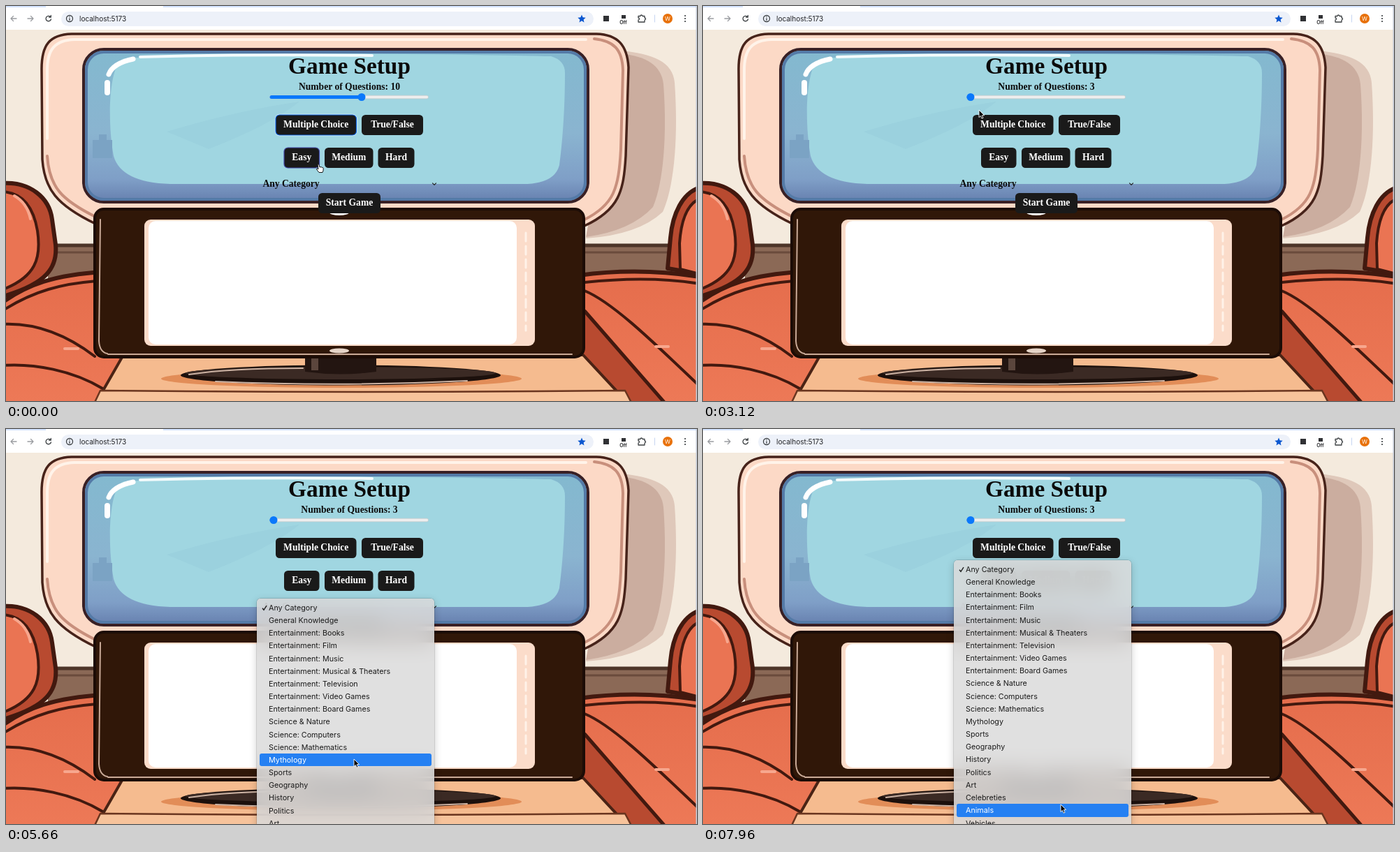
Recreate the animation shown at these times as an HTML page. Size 989 px wide and 566 px high, loop 8 s.

```html
<!DOCTYPE html>
<html lang="en">
<head>
<meta charset="utf-8">
<title>Game Setup</title>
<style>
html, body { margin: 0; width: 100%; height: 100%; overflow: hidden; }
#stage { position: relative; width: 989px; height: 566px; overflow: hidden; }
svg { position: absolute; left: 0; top: 0; }
.ui { font: 10px Inter, sans-serif; fill: #202124; }
.quirky { font: bold 13.6px "Liberation Serif", serif; text-anchor: middle; }
#menu { position: absolute; left: 359px; bottom: -20px; width: 246px; padding: 4px;
  border-radius: 5px; background: rgba(219,219,219,.86); backdrop-filter: blur(16px);
  box-shadow: 0 0 0 .5px rgba(0,0,0,.25), 0 3px 12px rgba(0,0,0,.2);
  font: 10.75px/19.2px Inter, sans-serif; color: #1b1b1b; white-space: nowrap; }
#menu div { position: relative; height: 18.17px; padding-left: 13px; border-radius: 3px; }
#menu div.on { background: #2580f2; color: #fff; }
#menu svg { left: 3px; top: 5px; }
</style>
</head>
<body>
<div id="stage">
<svg width="989" height="566" fill="none" stroke-linejoin="round" stroke-linecap="round">
  <defs>
    <linearGradient id="glass" x2="0" y2="1">
      <stop stop-color="#83b9cf"/><stop offset=".55" stop-color="#8ab4d0"/>
      <stop offset=".85" stop-color="#7f9fc7"/><stop offset="1" stop-color="#667fae"/>
    </linearGradient>
    <linearGradient id="seat" x2="0" y2="1">
      <stop stop-color="#e56d4c"/><stop offset="1" stop-color="#ed7957"/>
    </linearGradient>
  </defs>

  <!-- room -->
  <path fill="#f4eadd" d="M0 34H989V566H0z"/>
  <path fill="#dfc8ba" d="M880 64C925 68 955 80 957 110C962 180 958 255 940 295Q905 328 830 333z"/>
  <path fill="#cbad9f" d="M880 68C915 72 938 84 941 112C946 180 942 250 926 288Q895 322 830 331z"/>
  <path fill="#8b6956" d="M60 342H960V400H60z"/>
  <path stroke="#4c3428" stroke-width="5" d="M66 343H130M826 343H952"/>
  <path stroke="#6a4b3c" stroke-width="3" d="M70 353H130M826 353H952"/>

  <!-- sofa, left and right -->
  <g stroke="#42190f" stroke-width="6">
    <path fill="url(#seat)" d="M-4 424C30 400 68 385 140 381V500L170 503 130 570H-4z"/>
    <path fill="#b84a30" d="M-4 254C34 252 62 274 66 306L71 342C74 375 58 398 -4 416z"/>
    <path fill="#ea7453" stroke-width="4" d="M-4 266C26 268 40 292 45 322C51 362 42 388 -4 406z"/>
    <path fill="url(#seat)" d="M820 386C870 379 930 378 993 388V570H885L820 500z"/>
    <path fill="#b84a30" d="M993 260C968 268 954 298 951 332L947 376 993 384z"/>
    <path fill="#ea7453" stroke-width="4" d="M993 276C974 284 966 310 964 340L965 377 993 384z"/>
    <path fill="#b84a30" stroke-width="5" d="M815 426L829 438 944 570H888L815 496z"/>
    <path stroke-width="4" d="M-4 436C40 408 80 398 130 394M-4 456C40 454 85 470 127 502M-4 515C40 512 95 522 138 548M828 396Q920 386 993 398M828 408C870 425 935 490 993 545"/>
  </g>
  <path stroke="#f7a78e" stroke-width="4" d="M12 272Q30 282 35 305M84 491H103M930 488H948"/>

  <!-- table and stand -->
  <path fill="#f5bb8f" stroke="#4a2315" stroke-width="4" d="M168 500H826L891 570H128z"/>
  <path fill="#f7c39b" stroke="#6a351f" stroke-width="2.500" d="M135 551Q500 555 886 551L896 570H126z"/>
  <ellipse cx="480" cy="534" rx="258" ry="13" fill="#e28d58"/>
  <ellipse cx="479" cy="529" rx="229" ry="14.500" fill="#1c100c"/>
  <ellipse cx="479" cy="526" rx="222" ry="9" fill="#3b2a24"/>
  <path stroke="#cbb2a3" stroke-width="2" d="M262 528Q320 519 425 519M300 538Q480 546 660 537"/>
  <path fill="#231511" d="M428 498H530V524Q479 531 428 524z"/>
  <path fill="#5b463d" d="M437 505H447V522H437z"/>

  <!-- upper television -->
  <path fill="#fcd9c6" stroke="#47231a" stroke-width="3.500" d="M51 90C51 56 62 41 94 40H845C876 41 889 56 891 88L887 215C884 265 878 292 828 315L128 312C72 285 55 262 52 220z"/>
  <path stroke="#c88f7c" stroke-width="4" d="M59 215C62 260 80 278 128 302M828 306C870 285 877 262 880 205L883 92C882 62 870 50 842 47"/>
  <path stroke="#fff3e9" stroke-width="4" d="M59 190V92C59 62 70 49 98 48H830"/>
  <rect x="111" y="62" width="722" height="219" rx="29" fill="url(#glass)" stroke="#392025" stroke-width="4"/>
  <rect x="115" y="66" width="714" height="211" rx="25" stroke="#547aa7" stroke-width="4"/>
  <path fill="#a0d6e1" d="M170 75Q400 64 780 72Q801 78 800 98C800 150 796 200 792 228Q785 255 740 255H235Q165 253 154 215C144 160 148 78 170 75z"/>
  <path fill="#9bd1de" d="M230 180Q330 150 420 137Q380 170 290 205z"/>
  <path fill="#7ba3c4" d="M124 218V192H133V184H144V192H152V218z"/>
  <path stroke="#fff" stroke-width="8" d="M145 110V124"/>
  <path stroke="#fff" stroke-width="7" d="M147 98Q153 82 182 76"/>
  <path stroke="#f3fbfc" stroke-width="4" d="M192 73Q330 69 524 71"/>

  <!-- lower television -->
  <path fill="#fcd9c6" d="M130 283H826V292H130z"/>
  <rect x="127" y="291" width="700" height="212" rx="13" fill="#301708" stroke="#1c0c06" stroke-width="4"/>
  <path stroke="#c9aa98" stroke-width="2" d="M135 306L133 480Q134 496 145 498M146 499H810"/>
  <rect x="198" y="306" width="559" height="181" rx="9" fill="#fbdcca"/>
  <rect x="204" y="308" width="527" height="177" rx="10" fill="#fff"/>
  <path stroke="#fff2e8" stroke-width="3" stroke-dasharray="12 7" d="M744 325V465"/>
  <ellipse cx="477" cy="296" rx="14" ry="4" fill="#fff"/>
  <ellipse cx="477" cy="494" rx="14" ry="3.500" fill="#e5d3c6"/>

  <!-- browser bar -->
  <path fill="#fff" d="M0 0H989V34H0z"/>
  <path fill="#d3e3fd" d="M0 0H57V2H0zM225 0H989V2H225z"/>
  <rect x="79" y="8" width="762" height="21" rx="10.500" fill="#edf1f9"/>
  <path stroke="#9b9da1" stroke-width="1.300" d="M15 18H7M10.500 14.500L7 18 10.500 21.500M31 18H39M35.500 14.500L39 18 35.500 21.500"/>
  <g stroke="#3c4043" stroke-width="1.300">
    <path d="M63.500 15.500A3.700 3.700 0 1 0 64.400 19M64.300 13.500V16.200H61.500"/>
    <circle cx="91" cy="18" r="4.500"/><path d="M91 17.800V20.200M91 15.700V15.800"/>
    <path d="M905 14.500H908A1.500 1.500 0 0 1 911 14.500H914V17A1.500 1.500 0 0 1 914 20V23H905V20A1.500 1.500 0 0 0 905 17z"/>
  </g>
  <path fill="#0b57d0" d="M824 12.500L825.600 16.300 829.700 16.700 826.600 19.400 827.500 23.400 824 21.300 820.500 23.400 821.400 19.400 818.300 16.700 822.400 16.300z"/>
  <path fill="#303134" d="M855 14H863V22H855zM881 13H887V18H881z"/>
  <path stroke="#c6d5f1" d="M928.500 13V23"/>
  <circle cx="947" cy="18" r="7" fill="#e8710a"/>
  <path stroke="#3c4043" stroke-width="2.200" d="M972 14V14.010M972 18V18.010M972 22V22.010"/>
  <g class="ui">
    <text x="105" y="21.700">localhost:5173</text>
    <text x="883.500" y="25.500" style="font-size:7px;font-weight:600" text-anchor="middle">Off</text>
    <text x="947" y="20.900" style="font-size:8px;fill:#fff" text-anchor="middle">W</text>
  </g>
  <path stroke="#c3cad6" stroke-width="2" d="M988.500 0V566"/>

  <!-- form -->
  <g class="quirky" fill="#0b0b0b">
    <text x="491.500" y="96.500" style="font-size:33.300px">Game Setup</text>
    <text id="count" x="491.500" y="120"></text>
    <text x="408" y="259">Any Category</text>
  </g>
  <path stroke="#222" stroke-width="1.200" d="M610.500 253.800L613 256.300 615.500 253.800"/>
  <rect x="377.500" y="128.200" width="227" height="4.600" rx="2.300" fill="#eee" stroke="#c4c4c4" stroke-width=".6"/>
  <g id="slider">
    <rect id="fill" x="377.500" y="128" height="5" rx="2.500"/>
    <circle id="thumb" cy="130.500" r="5.500"/>
  </g>
  <g id="buttons" class="quirky"></g>
</svg>
<div id="menu"></div>
<svg width="989" height="566">
  <g id="pointer" stroke-linejoin="round">
    <path id="arrow" fill="#000" stroke="#fff" stroke-width=".9" d="M0 0V10.600L2.400 8.400 4.100 12.200 6 11.400 4.300 7.700H7.600z"/>
    <path id="hand" fill="#fff" stroke="#000" stroke-width=".9" d="M-1 0Q.2-1 1 .4L2 4Q3 3 4 4Q5 3.300 5.700 4.500Q7 4.200 7.200 5.500L7 9 6 11.500H1L-2.500 7Q-2.500 5.500-1 6L0 6.800z"/>
  </g>
</svg>
</div>
<script>
const LOOP = 8000, ROW = 18.17, MENU_TOP = 243, FIRST_ROW = 256;
const $ = id => document.getElementById(id);
const NS = "http://www.w3.org/2000/svg";

function add(parent, tag, attrs, text = "") {
  const el = document.createElementNS(NS, tag);
  for (const name in attrs) el.setAttribute(name, attrs[name]);
  el.textContent = text;
  return parent.appendChild(el);
}

const buttons = [
  ["Multiple Choice", 386, 156, 115.5], ["True/False", 509, 156, 88],
  ["Easy", 398, 203, 50.5], ["Medium", 456, 203, 69.5], ["Hard", 532.5, 203, 52],
  ["Start Game", 447, 268, 89]
].map(([label, x, y, width]) => {
  const group = $("buttons"), box = { x, y, width, height: 29, rx: 5.5 };
  const halo = add(group, "rect", { ...box, stroke: "#fff", "stroke-width": 2.4, "stroke-opacity": .7 });
  const rect = add(group, "rect", { ...box, fill: "#1a1a1a", "stroke-width": 1.2 });
  add(group, "text", { x: x + width / 2, y: y + 18, fill: "#fff" }, label);
  return { label, halo, rect,
    contains: (px, py) => px >= x && px <= x + width && py >= y && py <= y + 29 };
});

const rows = ["Any Category", "General Knowledge",
  ...["Books", "Film", "Music", "Musical & Theaters", "Television", "Video Games", "Board Games"]
    .map(name => "Entertainment: " + name),
  "Science & Nature", "Science: Computers", "Science: Mathematics", "Mythology", "Sports",
  "Geography", "History", "Politics", "Art", "Celebreties", "Animals", "Vehicles"
].map(name => {
  const row = document.createElement("div");
  row.textContent = name;
  return $("menu").appendChild(row);
});
const check = add(rows[0], "svg", { width: 8, height: 9 });
add(check, "path", { d: "M1 4.8L3 7.3 7 1.2", fill: "none", stroke: "currentColor", "stroke-width": 1.4 });

// pointer tip: time, x, y
const path = [
  [0, 447, 227], [110, 447, 227], [320, 430, 220], [710, 556, 220], [1010, 492, 220],
  [1160, 495, 222], [1310, 510, 278], [1460, 510, 278], [2060, 440, 140], [2210, 383, 131],
  [2660, 383, 131], [3110, 395, 149], [3560, 420, 225], [3710, 408, 256], [4010, 408, 256],
  [4910, 470, 306], [5060, 470, 306], [5360, 492, 443], [5660, 498, 473], [6260, 498, 473],
  [7160, 511, 546], [7460, 511, 546], [7910, 512, 538], [LOOP, 512, 538]
];

function pointerAt(t) {
  const tick = t < 110 ? 0 : t - (t - 110) % 150;
  const i = path.findIndex(key => key[0] > tick);
  const [t0, x0, y0] = path[i - 1], [t1, x1, y1] = path[i];
  const p = (tick - t0) / (t1 - t0);
  return [x0 + (x1 - x0) * p, y0 + (y1 - y0) * p];
}

function focusAt(t) {
  return t < 320 ? "Multiple Choice" : t < 920 ? "Easy" : t < 2320 ? "Medium" : "";
}

function draw(t) {
  const [x, y] = pointerAt(t);
  const open = t >= 3870, focus = focusAt(t);
  let overButton = false;

  for (const { label, halo, rect, contains } of buttons) {
    const hover = !open && contains(x, y), focused = label === focus;
    overButton ||= hover;
    halo.style.display = focused ? "" : "none";
    rect.setAttribute("stroke", focused ? "#0b66e4" : hover ? "#4348a8" : "none");
  }

  const value = t < 2470 ? 10 : 3, thumbX = 383 + (value - 3) * 18;
  const overSlider = !open && y > 124 && y < 137 && x > 377 && x < 605;
  $("count").textContent = "Number of Questions: " + value;
  $("thumb").setAttribute("cx", thumbX);
  $("fill").setAttribute("width", thumbX - 377.5);
  $("slider").setAttribute("fill", overSlider ? "#005cc8" : "#0a78fb");

  const scroll = Math.max(0, Math.min(3, Math.floor((t - 7510) / 150) + 1)) * ROW;
  const active = Math.round((y - FIRST_ROW + scroll) / ROW);
  $("menu").style.display = open ? "" : "none";
  $("menu").style.top = MENU_TOP - scroll + "px";
  rows.forEach((row, i) => row.classList.toggle("on", i === active));

  $("pointer").setAttribute("transform", `translate(${x} ${y})`);
  $("hand").style.display = overButton ? "" : "none";
  $("arrow").style.display = overButton ? "none" : "";
}

function frame() {
  draw(performance.now() % LOOP);
  requestAnimationFrame(frame);
}
frame();
</script>
</body>
</html>
```
